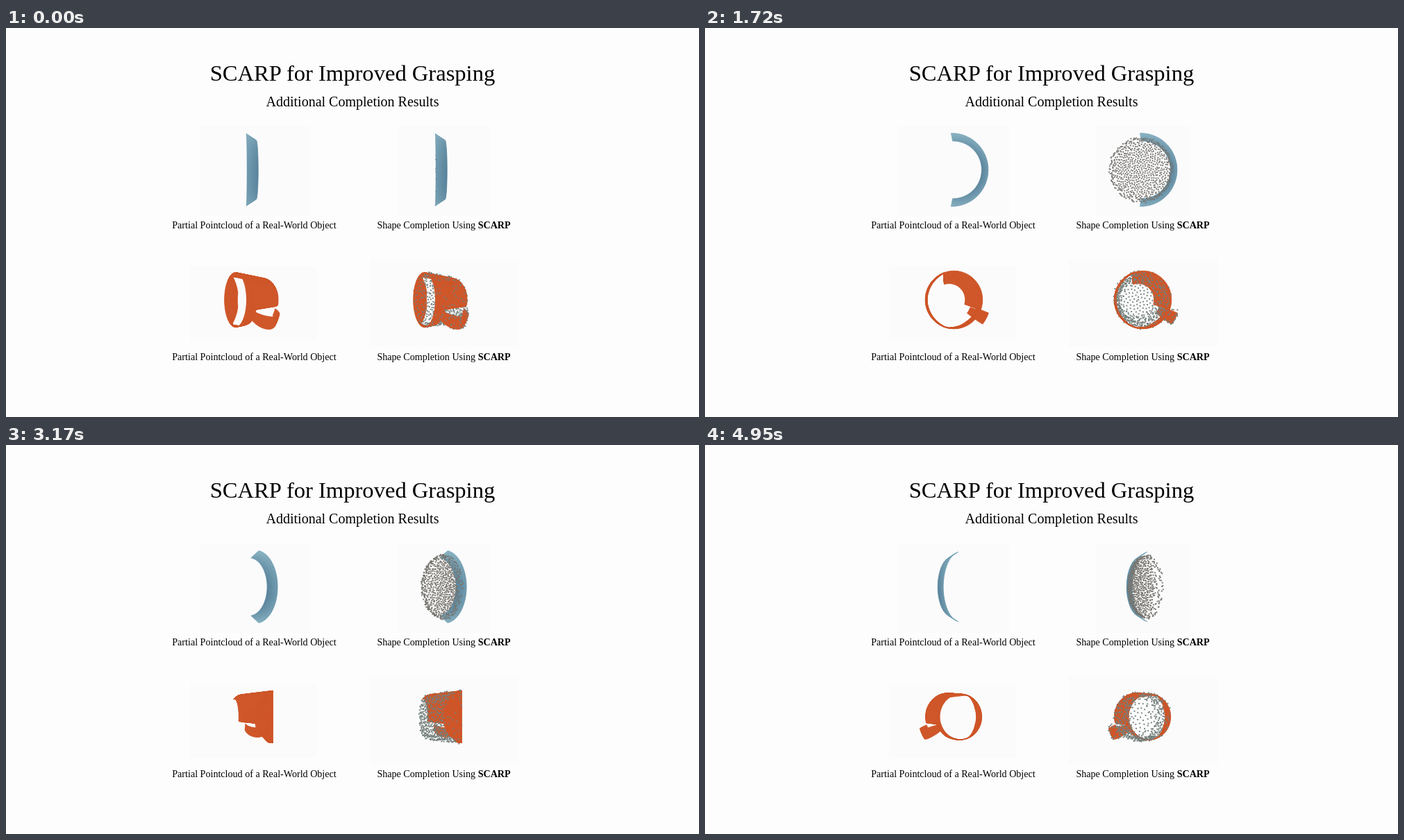
An HTML page with a canvas that plays this animation: 998 px wide and 561 px high, repeating every 4980 ms.

```html
<!DOCTYPE html>
<html lang="en">
<head>
<meta charset="utf-8">
<title>Completion results</title>
<style>
  html, body { margin: 0; width: 100%; height: 100%; overflow: hidden; background: #fdfdfd; }
  svg, canvas { position: absolute; left: 0; top: 0; width: 998px; height: 561px; }
  text { font-family: "Liberation Serif", "Times New Roman", serif; font-size: 14.1px; text-anchor: middle; }
  .strong { font-weight: bold; }
</style>
</head>
<body>
<svg viewBox="0 0 998 561">
  <g fill="#fbfbfc">
    <rect x="279" y="142" width="159" height="129"/>
    <rect x="563" y="142" width="134" height="129"/>
    <rect x="265" y="344" width="183" height="107"/>
    <rect x="524" y="334" width="215" height="126"/>
  </g>
  <text x="499" y="76" style="font-size:32.6px">SCARP for Improved Grasping</text>
  <text x="499" y="112.5" style="font-size:20px">Additional Completion Results</text>
  <text x="357.5" y="289">Partial Pointcloud of a Real-World Object</text>
  <text x="630.5" y="289">Shape Completion Using <tspan class="strong">SCARP</tspan></text>
  <text x="357.5" y="479">Partial Pointcloud of a Real-World Object</text>
  <text x="630.5" y="479">Shape Completion Using <tspan class="strong">SCARP</tspan></text>
</svg>
<canvas width="998" height="561"></canvas>
<script>
const ctx = document.querySelector('canvas').getContext('2d');
const LOOP = 4980, FRAMES = 150, RAD = Math.PI / 180;
const times = [0, 630, 1720, 2440, 3170, 4220, 4950];
const bowlTurn = [-87, -57, -8, 18, 53, 92, 118];
const mugTurn = [-60, -32, 9, 51, 83, 126, 154];
const clamp = (v, lo, hi) => Math.min(hi, Math.max(lo, v));
const mix = (a, b, u) => a + (b - a) * u;

let seed = 7;
function rand() {
  seed = (seed * 1664525 + 1013904223) % 4294967296;
  return seed / 4294967296;
}
const between = (lo, hi) => mix(lo, hi, rand());

// Smooth curve through the turn angles
function turnAt(values, t) {
  const last = times.length - 1;
  let i = 0;
  while (i < last - 1 && t > times[i + 1]) i++;
  const slope = k => {
    const a = Math.max(0, k - 1), b = Math.min(last, k + 1);
    return (values[b] - values[a]) / (times[b] - times[a]);
  };
  const span = times[i + 1] - times[i], u = (t - times[i]) / span, v = 1 - u;
  return values[i] * (1 + 2 * u) * v * v + values[i + 1] * (3 - 2 * u) * u * u
    + span * u * v * (slope(i) * v - slope(i + 1) * u);
}

// Cylindrical point: radius, angle in degrees (0 right, 90 down), height along the opening
const polar = (r, deg, h) => [r * Math.cos(deg * RAD), r * Math.sin(deg * RAD), h];

function patch(surface, u, v, du, dv, color) {
  return {
    color,
    points: [surface(u, v), surface(u + du, v), surface(u + du, v + dv), surface(u, v + dv)]
  };
}

// ---- bowl ----
const bowlSurface = (deg, k) => polar(51 - 9 * k, deg, 10 - 14 * k);

function buildBowl() {
  const parts = [];
  for (let deg = -90; deg < 90; deg += 5)
    for (let k = 0; k < 1; k += 0.25) {
      const shade = 14 * Math.cos((deg - 8) * RAD * 1.6) + 22 * k;
      const color = `rgb(${122 - shade | 0},${164 - shade | 0},${182 - shade * 0.8 | 0})`;
      parts.push(patch(bowlSurface, deg, k, 5, 0.25, color));
    }
  return parts;
}
function buildBowlDots() {
  const dots = [];
  for (let i = 0; i < 500; i++) {
    const r = 41 * Math.sqrt((i + 0.5) / 500) + between(-0.8, 0.8);
    dots.push(polar(r, i * 137.508 + between(-2, 2), between(-3.5, -1)));
  }
  for (let i = 0; i < 240; i++) {
    const k = rand();
    dots.push(polar(45.5 - 4 * k + between(-1, 1), i * 137.508, 8 - 10 * k));
  }
  return dots;
}

// ---- mug ----
const TOP = 29, BOTTOM = -26;
function mugRadius(h) {
  const round = Math.max(0, (-16 - h) / 10);
  return 31 + 5.5 * (h - BOTTOM) / (TOP - BOTTOM) - 5 * round * round;
}
const handleSurface = (turn, deg) =>
  polar(34 + 23 * Math.sin(turn * RAD), deg, 2 + 18 * Math.cos(turn * RAD));

// Depth down to which the camera captured the wall at each angle
function captureDepth(deg) {
  if (deg >= -108 && deg <= 16) return BOTTOM;
  if (deg > 16 && deg < 100) return 14 + Math.max(0, deg - 60) * 0.25;
  const facing = -Math.cos(deg * RAD);
  return TOP - Math.max(3, 21 * clamp((facing - 0.25) / 0.7, 0, 1));
}
function capturedWall(deg, k) {
  const h = mix(captureDepth(deg), TOP, k);
  return polar(mugRadius(h), deg, h);
}
function buildMug() {
  const parts = [], orange = '#cf5629', rows = 16;
  for (let deg = -180; deg < 180; deg += 4)
    for (let row = 0; row < rows; row++)
      parts.push(patch(capturedWall, deg, row / rows, 4, 1 / rows, orange));
  for (let turn = 0; turn < 180; turn += 12)
    for (let deg = 20; deg < 38; deg += 6)
      parts.push(patch(handleSurface, turn, deg, 12, 6, orange));
  return parts;
}
function buildMugDots() {
  const dots = [];
  for (let i = 0; i < 640; i++) {
    const h = mix(BOTTOM, TOP, (i + rand()) / 640);
    dots.push(polar(mugRadius(h) + between(-3.4, 1.8), i * 137.508 + between(-4, 4), h));
  }
  for (let i = 0; i < 75; i++)
    dots.push(polar(27 * Math.sqrt(i / 75), i * 137.508, BOTTOM + between(-1, 2)));
  for (let i = 0; i < 80; i++) {
    const p = handleSurface(between(0, 180), between(16, 41));
    dots.push(p.map(c => c + between(-1.5, 1.5)));
  }
  return dots;
}

// ---- drawing ----
function projector({ cx, cy, camera }, degrees) {
  const s = Math.sin(degrees * RAD), c = Math.cos(degrees * RAD);
  return ([x, y, h]) => {
    const z = h * c - x * s, scale = camera / (camera - z);
    return [cx + (x * c + h * s) * scale, cy + y * scale, z];
  };
}
function drawCloud(view, degrees, parts, dots = [], dotColor = '') {
  const project = projector(view, degrees);
  const items = parts.map(({ points, color }) => {
    const shape = points.map(project);
    return { shape, color, z: shape.reduce((sum, p) => sum + p[2], 0) / 4 };
  });
  for (const dot of dots) {
    const at = project(dot);
    items.push({ at, z: at[2] });
  }
  items.sort((a, b) => a.z - b.z);
  ctx.lineWidth = 0.8;
  ctx.lineJoin = 'round';
  for (const { shape, color, at } of items) {
    if (at) {
      ctx.fillStyle = dotColor;
      ctx.fillRect(at[0] - 0.95, at[1] - 0.95, 1.9, 1.9);
      continue;
    }
    ctx.fillStyle = ctx.strokeStyle = color;
    ctx.beginPath();
    shape.forEach(p => ctx.lineTo(p[0], p[1]));
    ctx.closePath();
    ctx.fill();
    ctx.stroke();
  }
}

const bowl = buildBowl(), bowlDots = buildBowlDots();
const mug = buildMug(), mugDots = buildMugDots();
const bowlView = cx => ({ cx, cy: 204.5, camera: 300 });
const mugView = cx => ({ cx, cy: 392, camera: 230 });

function draw(now) {
  const step = Math.floor((now % LOOP) / LOOP * FRAMES + 0.01);
  const t = step * LOOP / FRAMES;
  const bowlAngle = turnAt(bowlTurn, t), mugAngle = turnAt(mugTurn, t);
  ctx.clearRect(0, 0, 998, 561);
  drawCloud(bowlView(356), bowlAngle, bowl);
  drawCloud(bowlView(628), bowlAngle, bowl, bowlDots, '#77756f');
  drawCloud(mugView(355), mugAngle, mug);
  drawCloud(mugView(627), mugAngle, mug, mugDots, '#74807c');
}

const start = performance.now();
function tick() {
  draw(performance.now() - start);
  requestAnimationFrame(tick);
}
tick();
</script>
</body>
</html>
```
